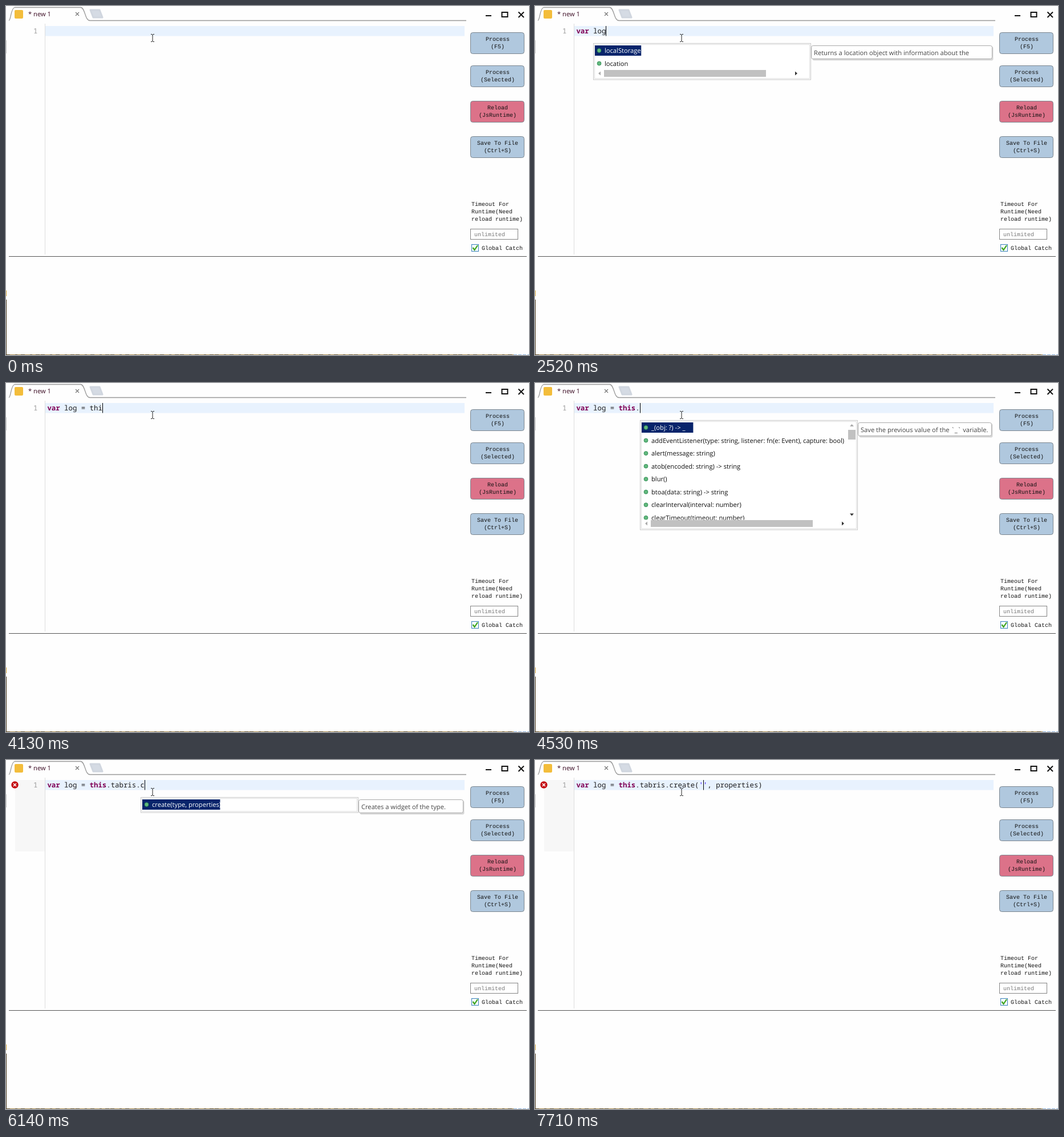
Recreate the animation shown at these times as an HTML page. Size 917 by 611 pixels, loop 8 s.

```html
<!DOCTYPE html>
<html lang="en">
<head>
<meta charset="utf-8">
<title>Script editor</title>
<style>
html, body { margin: 0; width: 100%; height: 100%; overflow: hidden; background: #fefefe; }
svg { display: block; }
text { white-space: pre; text-rendering: geometricPrecision; }
.code { font: 12.37px "Noto Sans Mono", monospace; fill: #1c1c1c; }
.code .key { font-weight: bold; fill: #7f0055; }
.code .str { fill: #2a00ff; }
.ui { font: 11.17px "Open Sans", "Noto Sans", sans-serif; }
.form { font: 10px "Liberation Mono", monospace; fill: #111; }
</style>
</head>
<body>
<svg width="917" height="611" viewBox="0 0 917 611">
  <defs>
    <pattern id="fringe" width="61" height="1" patternUnits="userSpaceOnUse">
      <path d="M0 .5H61" stroke="#a88a4c"/>
      <path d="M0 .5H61" stroke="#5c4a26" stroke-dasharray="7 9 4 6"/>
    </pattern>
    <clipPath id="list"><rect x="2" y="3" width="362" height="172"/></clipPath>
  </defs>

  <!-- tab strip and window controls -->
  <path d="M5 25.5 C9 24 8 5 15 2.5 H131 C139 3 138 25 147 25.5 H807" fill="none" stroke="#999" stroke-width="1.3"/>
  <rect x="15" y="7" width="15" height="15" rx="2" fill="#f3bd3b"/>
  <text class="ui" x="39" y="18" fill="#3a0a22">* new 1</text>
  <path d="M122 11 l6 6 m0 -6 l-6 6" stroke="#777" stroke-width="1.2"/>
  <path d="M148 7 H164 L169 20 H153 Z" fill="#d5dbe4" stroke="#d0d6df" stroke-width="3" stroke-linejoin="round"/>
  <g fill="none" stroke="#111" stroke-width="2">
    <path d="M841 17 H851"/>
    <rect x="869.5" y="11" width="10" height="8"/>
    <path d="M898.5 10.5 l9.5 9.5 m0 -9.5 l-9.5 9.5"/>
  </g>

  <!-- stray desktop pixels around the window -->
  <path d="M.5 60 V83" stroke="#ccc"/>
  <path d="M.5 498 V508" stroke="#d8a93c"/>
  <path d="M.5 514 V611" stroke="#4a3a20"/>
  <rect y="610" width="890" height="1" fill="url(#fringe)"/>
  <path d="M890 610.5 H917" stroke="#8fb4dc" stroke-dasharray="6 2"/>

  <g id="editor"></g>
  <path d="M68.5 31 V435" stroke="#ddd"/>
  <text class="code" x="48" y="48" style="fill:#999">1</text>
  <path d="M5 438.5 H913" stroke="#555"/>

  <!-- side panel -->
  <g id="buttons" class="form" text-anchor="middle"></g>
  <g class="form">
    <text x="816" y="350">Timeout For</text>
    <text x="816" y="363">Runtime(Need</text>
    <text x="816" y="376">reload runtime)</text>
    <rect x="814.5" y="390.5" width="83" height="18" fill="#fff" stroke="#858585"/>
    <text x="821" y="403" style="fill:#777">unlimited</text>
    <rect x="816.5" y="417.5" width="12" height="12" fill="#f4f9ff" stroke="#3c83b9"/>
    <path d="M818.5 423 l3 4 l5.5 -8" fill="none" stroke="#3fa61c" stroke-width="2.2"/>
    <text x="834" y="426.5">Global Catch</text>
  </g>

  <g id="overlay"></g>
  <path d="M254 49.5 H256 L257 50.5 L258 49.5 H260 M257 50 V62 M254 62.5 H256 L257 61.5 L258 62.5 H260" fill="none" stroke="#222"/>
</svg>

<script>
const LOOP = 8000, LEFT = 72.4, CHAR = 7.42;
const $ = id => document.getElementById(id);
const esc = s => s.replace(/&/g, '&amp;').replace(/</g, '&lt;').replace(/>/g, '&gt;');
const col = n => LEFT + n * CHAR;
const rect = (x, y, w, h, fill, more = '') =>
  `<rect x="${x}" y="${y}" width="${w}" height="${h}" fill="${fill}" ${more}/>`;
const path = (d, fill) => `<path d="${d}" fill="${fill}"/>`;

$('buttons').innerHTML = [
  [46.5, 'Process', '(F5)'],
  [104.5, 'Process', '(Selected)'],
  [166.5, 'Reload', '(JsRuntime)', '#dc7289'],
  [228.5, 'Save To File', '(Ctrl+S)']
].map(([y, a, b, fill = '#b0c8de']) =>
  rect(814.5, y, 94, 37, fill, 'rx="4" stroke="#7c868f"') +
  `<text x="862" y="${y + 14.5}">${a}</text><text x="862" y="${y + 27.5}">${b}</text>`).join('');

// Label of a completion: name, arguments, return type
const label = ([name, args, type]) =>
  name + (args === undefined ? '' : `(${args})`) + (type ? ` -> ${type}` : '');

const create = ['create', 'type, properties'];
const tip = 'Creates a widget of the type.';

// Completion lists: column, rows, height, tooltip and its width, scrollbars
const lists = {
  local: { at: 4, rows: [['localStorage'], ['location']], h: 64, bar: 'h', tipW: 317,
    tip: 'Returns a location object with information about the' },
  self: { at: 15, h: 192, bar: 'vh', tipW: 234, tip: 'Save the previous value of the `_` variable.',
    rows: [
      ['_', 'obj: ?', '_'],
      ['addEventListener', 'type: string, listener: fn(e: Event), capture: bool'],
      ['alert', 'message: string'],
      ['atob', 'encoded: string', 'string'],
      ['blur', ''],
      ['btoa', 'data: string', 'string'],
      ['clearInterval', 'interval: number'],
      ['clearTimeout', 'timeout: number']
    ] },
  t: { at: 15, h: 94,
    rows: [['tabris'], ['toLocaleString', '', 'string'], ['toString', '', 'string'], ['top']] },
  member: { at: 22, h: 27, rows: [create], tip, tipW: 183 },
  create: { at: 22, h: 49, rows: [create, ['constructor']], tip, tipW: 183 }
};

const head = 'var log = this.tabris.';
const call = head + 'create(';

// Each step changes only the listed parts of the state
const steps = [
  [0, { text: '', caret: -1, mark: null, list: null, line: true, error: false, gutter: false, pair: null }],
  [140, { caret: 0 }],
  [540, { caret: -1 }],
  [670, { text: 'v', caret: 1 }],
  [1090, { text: 'va', caret: 2 }],
  [1210, { mark: [0, 2] }],
  [1460, { text: 'var', caret: 3, mark: [0, 3] }],
  [1860, { text: 'var ', caret: 4 }],
  [2010, { mark: null }],
  [2160, { text: 'var l', caret: 5 }],
  [2280, { list: 'local' }],
  [2400, { text: 'var lo', caret: 6 }],
  [2520, { text: 'var log', caret: 7 }],
  [2670, { list: null }],
  [2820, { mark: [4, 3] }],
  [3070, { text: 'var log ', caret: 8, mark: null }],
  [3340, { text: 'var log =', caret: 9 }],
  [3490, { text: 'var log = ', caret: 10 }],
  [3740, { text: 'var log = t', caret: 11 }],
  [3890, { text: 'var log = th', caret: 12 }],
  [4010, { text: 'var log = thi', caret: 13 }],
  [4140, { text: 'var log = this', caret: 14 }],
  [4260, { mark: [10, 4] }],
  [4410, { text: 'var log = this.', caret: 15, mark: null }],
  [4530, { list: 'self' }],
  [4830, { text: 'var log = this.t', caret: 16, list: 't' }],
  [4950, { error: true }],
  [5410, { text: 'var log = this.tabris', caret: 21, list: null, gutter: true }],
  [5530, { mark: [15, 6] }],
  [5840, { text: head, caret: 22, mark: null, list: 'member' }],
  [6140, { text: head + 'c', caret: 23 }],
  [6270, { list: 'create' }],
  [6550, { text: call + 'type, properties)', caret: -1, list: null, line: false, mark: [29, 4, '#d9d9d9'] }],
  [6700, { mark: [29, 4, '#cdaef4'] }],
  [7280, { text: call + ', properties)', caret: 29, line: true, mark: null, pair: [28, 41] }],
  [7560, { pair: null }],
  [7710, { text: call + "'', properties)", caret: 30 }]
];

const paint = text => esc(text)
  .replace(/\b(var|this)\b/g, '<tspan class="key">$&</tspan>')
  .replace(/'[^']*'/g, '<tspan class="str">$&</tspan>');

function drawEditor(s) {
  let out = '';
  if (s.gutter) out += rect(16, 35, 52, 125, '#f7f7f7');
  if (s.line) out += rect(69, 35, 735, 17.5, '#e8f2fe');
  if (s.error) out += '<circle cx="15.5" cy="43.5" r="6.2" fill="#c40d12"/>' +
    '<path d="M13 41 l5 5 m0 -5 l-5 5" stroke="#fff" stroke-width="1.6"/>';
  if (s.mark) out += rect(col(s.mark[0]), 36, s.mark[1] * CHAR, 15.5, s.mark[2] || '#d9b0f4');
  out += `<text class="code" x="${LEFT}" y="48">${paint(s.text)}</text>`;
  for (const n of s.pair || []) out += rect(col(n) - .5, 35.5, CHAR + .5, 16, 'none', 'stroke="#888"');
  if (s.caret >= 0) out += rect(Math.round(col(s.caret)), 35, 1, 17.5, '#000');
  return out;
}

function drawList({ at, rows, h, tip, tipW, bar = '' }) {
  const w = 381;
  let out = rect(.5, .5, w, h - .5, '#fff', 'stroke="#c9c9c9"') +
    rect(2.5, 2.5, w - 4, h - 4.5, '#fff', 'stroke="#ddd"') + '<g clip-path="url(#list)">';
  rows.map(label).forEach((row, i) => {
    const y = 13 + i * 22.55;
    if (!i) out += rect(3, 4, 26 + row.length * 4.6, 18, '#08246b');
    out += `<circle cx="10.5" cy="${y}" r="3.4" fill="#62b97e" stroke="#348f56"/>` +
      `<text class="ui" x="20" y="${y + 4}" fill="${i ? '#111' : '#fff'}">${esc(row)}</text>`;
  });
  out += '</g>';
  if (bar.includes('v')) out += rect(365, 17, 13, 17, '#c1c1c1') +
    path('M368 11 l3.5 -4 l3.5 4 Z', '#aaa') + path('M368 163.5 l3.5 4 l3.5 -4 Z', '#333');
  if (bar.includes('h')) {
    const y = h - 11;
    out += rect(3, y - 6.5, 362, 13, '#fff') + rect(19, y - 6, 284, 12, '#c1c1c1') +
      path(`M13 ${y - 3.5} l-4 3.5 l4 3.5 Z`, '#aaa') +
      path(`M354 ${y - 3.5} l4 3.5 l-4 3.5 Z`, '#333');
  }
  if (tip) {
    out += rect(384.5, 6, tipW, 24.5, '#000', 'rx="3" opacity=".15"') +
      rect(382.5, 4.5, tipW, 23, '#fff', 'rx="3" stroke="#aaa"') +
      `<text class="ui" x="387" y="20.5" fill="#444">${tip}</text>`;
  }
  return `<g transform="translate(${Math.round(col(at))} 65)">${out}</g>`;
}

let shown = -1;
function frame() {
  const t = performance.now() % LOOP;
  const now = steps.filter(([at]) => at <= t).length;
  if (now !== shown) {
    shown = now;
    const s = Object.assign({}, ...steps.slice(0, now).map(step => step[1]));
    $('editor').innerHTML = drawEditor(s);
    $('overlay').innerHTML = s.list ? drawList(lists[s.list]) : '';
  }
  requestAnimationFrame(frame);
}
frame();
</script>
</body>
</html>
```
